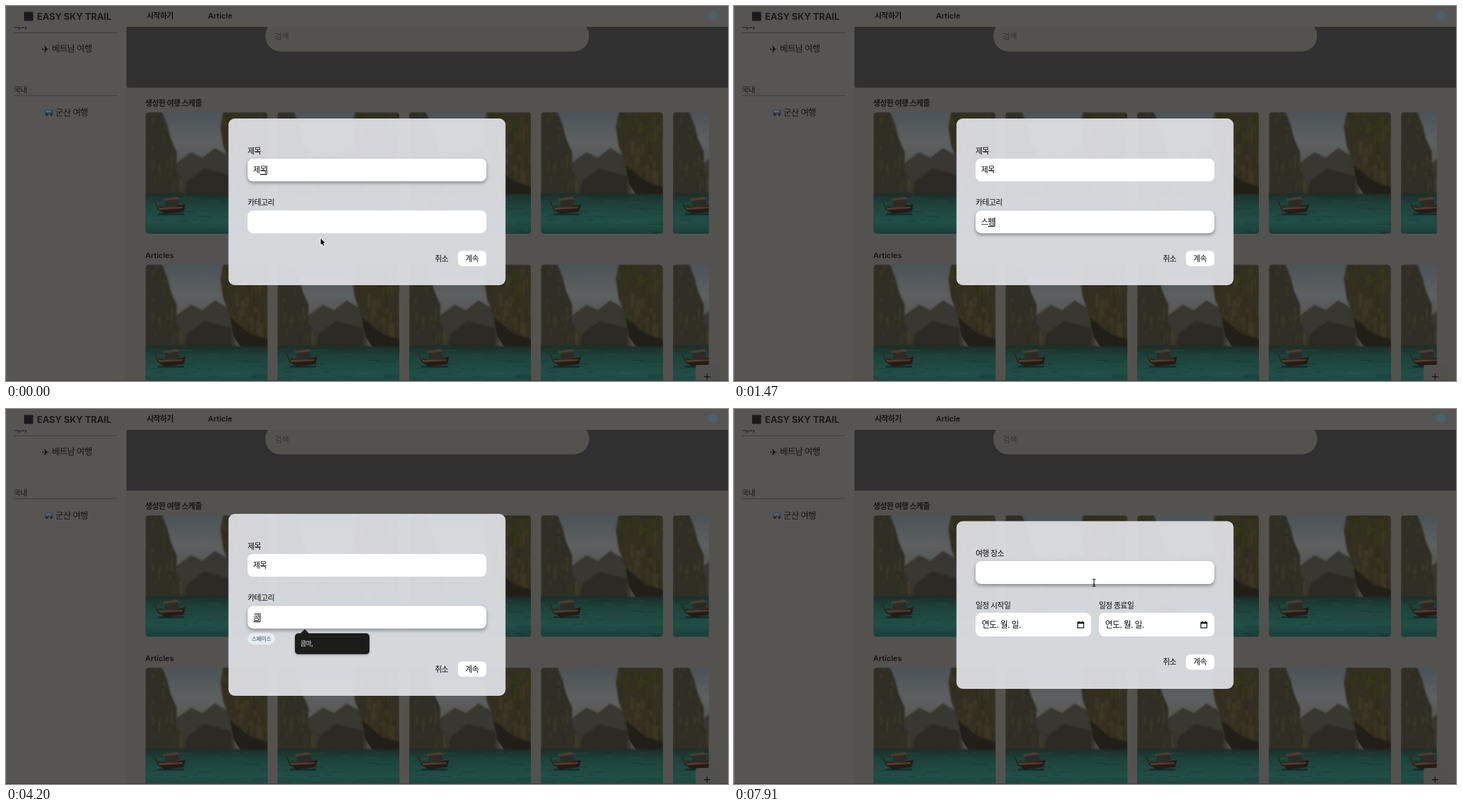
An HTML page with a canvas that plays this animation: 1037x540 px, repeating every 8000 ms.

```html
<!DOCTYPE html>
<html lang="ko">
<head>
<meta charset="utf-8">
<title>Travel planner</title>
<style>
  html, body { margin: 0; width: 100%; height: 100%; overflow: hidden; background: #54524e; }
  canvas { display: block; }
</style>
</head>
<body>
<canvas id="stage" width="1037" height="540"></canvas>
<script>
const W = 1037, H = 540, LOOP = 8000;
const FONT = 'Inter, "Noto Sans CJK KR", "Noto Sans CJK", sans-serif';
const screen = document.getElementById('stage').getContext('2d');
let ctx = screen;

function offscreen(w, h, draw) {
  const canvas = document.createElement('canvas');
  canvas.width = w;
  canvas.height = h;
  const previous = ctx;
  ctx = canvas.getContext('2d');
  draw();
  ctx = previous;
  return canvas;
}

function box(x, y, w, h, r, color) {
  ctx.fillStyle = color;
  ctx.beginPath();
  ctx.roundRect(x, y, w, h, r);
  ctx.fill();
}

function shape(points, color) {
  ctx.fillStyle = color;
  ctx.beginPath();
  points.forEach(([x, y]) => ctx.lineTo(x, y));
  ctx.closePath();
  ctx.fill();
}

function setFont(str, size, weight) {
  ctx.font = `${weight} ${size}px ${FONT}`;
  ctx.letterSpacing = /[ㄱ-힣]/.test(str) ? -size * 0.05 + 'px' : '0px';
}

// y is the vertical middle of the line
function text(str, x, y, size = 11, weight = 500, color = '#0b0b0c') {
  setFont(str, size, weight);
  ctx.fillStyle = color;
  ctx.fillText(str, x, y + size * 0.365);
}

function textWidth(str, size = 11, weight = 500) {
  setFont(str, size, weight);
  return ctx.measureText(str).width;
}

const ramp = (t, a, b) => Math.min(1, Math.max(0, (t - a) / (b - a)));

// ---------- static page ----------

function drawPhoto() {
  let seed = 7;
  const rnd = () => (seed = (seed * 16807) % 2147483647) / 2147483647;
  const streaks = (n, x, y, w, h, color) => {
    for (let i = 0; i < n; i++) {
      ctx.fillStyle = color(rnd());
      ctx.fillRect(x + rnd() * w, y + rnd() * h, 1 + rnd() * 4, 5 + rnd() * 18);
    }
  };

  const sky = ctx.createLinearGradient(0, 0, 0, 110);
  sky.addColorStop(0, '#4c5458');
  sky.addColorStop(0.4, '#5d6060');
  sky.addColorStop(1, '#4c4b46');
  box(0, 0, 176, 176, 0, sky);
  ctx.filter = 'blur(1.2px)';
  shape([[36, 80], [52, 68], [66, 58], [82, 66], [100, 52], [124, 66], [130, 122], [30, 122]], '#383732');
  shape([[60, 100], [84, 82], [124, 92], [124, 122], [54, 122]], '#2b2a24');

  const left = [[0, 0], [24, 0], [31, 18], [36, 38], [45, 58], [44, 84], [56, 102], [60, 120], [0, 122]];
  const right = [[112, 0], [176, 0], [176, 124], [138, 120], [126, 102], [122, 76], [112, 48], [108, 22]];
  const cliff = (points, color, decorate) => {
    ctx.save();
    shape(points, color);
    ctx.clip();
    decorate();
    ctx.restore();
  };
  cliff(left, '#302f25', () =>
    streaks(45, 0, 0, 55, 105, v => `rgba(${50 + v * 24},${51 + v * 17},${35 + v * 14},.5)`));
  cliff(right, '#343021', () => {
    streaks(55, 108, 0, 68, 105, v => `rgba(${42 + v * 36},${40 + v * 28},${24 + v * 22},.55)`);
    streaks(22, 106, 0, 70, 28, v => `rgba(${42 + v * 18},${49 + v * 17},22,.7)`);
    shape([[122, 76], [150, 100], [176, 108], [176, 126], [130, 122]], '#211f18');
  });

  const water = ctx.createLinearGradient(0, 116, 0, 176);
  water.addColorStop(0, '#1b2c27');
  water.addColorStop(0.3, '#1d443c');
  water.addColorStop(0.7, '#214f47');
  water.addColorStop(1, '#1b3f39');
  box(-4, 118, 184, 62, 0, water);
  ctx.filter = 'none';
  for (let i = 0; i < 34; i++) {
    ctx.fillStyle = i % 2 ? 'rgba(62,105,94,.25)' : 'rgba(15,34,31,.28)';
    ctx.fillRect(rnd() * 170, 122 + rnd() * 52, 6 + rnd() * 18, 1);
  }

  shape([[12, 127], [19, 136], [36, 138], [58, 133], [55, 144], [28, 147], [18, 141]], '#251b15');
  shape([[25, 125], [45, 122], [50, 126], [27, 129]], '#4a3d33');
  shape([[28, 128], [47, 126], [49, 136], [29, 138]], '#2e2a25');
  shape([[14, 130], [20, 138], [54, 137], [53, 139], [20, 141]], '#55402e');
  box(18, 146, 38, 3, 2, 'rgba(12,25,22,.55)');
}

const photo = offscreen(176, 176, drawPhoto);

function photoRow(y) {
  ctx.save();
  ctx.beginPath();
  ctx.rect(173, 0, 836.5, H);
  ctx.clip();
  for (let i = 0; i < 5; i++) {
    const x = 200.3 + i * 189.3;
    ctx.save();
    ctx.beginPath();
    ctx.roundRect(x, y, 175.5, 175.5, 5);
    ctx.clip();
    ctx.drawImage(photo, x, y, 175.5, 175.5);
    ctx.restore();
  }
  ctx.restore();
}

function drawPage() {
  const ink = '#171717', rule = '#403f3e', paper = '#54524e', side = '#565553';
  box(0, 0, W, H, 0, paper);
  box(0, 0, 173, H, 0, side);

  text('해외', 11, 29, 11, 400, ink);
  box(11, 38, 150, 1, 0, rule);
  text('✈', 51, 62, 13.5, 400, '#141414');
  text('베트남 여행', 66, 61.5, 12.5, 400, ink);
  text('국내', 11, 120.5, 11, 400, ink);
  box(11, 128.5, 150, 1, 0, rule);
  box(55.5, 149.5, 12.5, 7, 2, '#34475a');
  box(57, 150.5, 8, 2.5, 1, '#5c6870');
  box(57, 155, 3, 3, 1.5, '#1b1b1d');
  box(63.5, 155, 3, 3, 1.5, '#1b1b1d');
  text('군산 여행', 71, 153, 12.5, 400, ink);

  box(173, 30, 864, 87.5, 0, '#303030');
  box(372.5, 21, 465, 44.5, 22, paper);
  text('검색', 386, 43.5, 11.5, 400, '#353433');

  box(0, 0, W, 30, 0, side);
  box(26, 8.5, 13, 13, 0, '#1b1b1e');
  text('EASY SKY TRAIL', 44.5, 15.5, 13, 700, '#1b1b1e');
  text('시작하기', 202, 14, 11, 600, '#141414');
  text('Article', 290, 14, 11, 600, '#141414');
  box(1008, 7, 14, 14, 7, '#4a606b');

  text('생성한 여행 스케줄', 200, 139.5, 11, 600, ink);
  photoRow(152.7);
  text('Articles', 200, 358.5, 11, 600, ink);
  photoRow(372.2);

  box(990.5, 517, 34, 30, 3, '#50504f');
  box(1002.5, 533.2, 9, 1.2, 0, '#111');
  box(1006.4, 529.3, 1.2, 9, 0, '#111');
  box(0, 0, 1, H, 0, '#666563');
  box(0, 539, W, 1, 0, '#3f3d40');
}

const page = offscreen(W, H, drawPage);

// ---------- timeline ----------

// [time, category text, composing, suggestion rows, caret]
const steps = [
  [0, '', 0, 0, 0],
  [350, '', 0, 0, 1],
  [420, '', 0, 6, 1],
  [700, 'ㅅ', 1, 6, 1],
  [770, 'ㅅ', 1, 0, 1],
  [1120, '스', 1, 5, 1],
  [1260, '슾', 1, 0, 1],
  [1400, '스페', 1, 5, 1],
  [1470, '스펭', 1, 0, 1],
  [1540, '스페이', 1, 5, 1],
  [1680, '스페잇', 1, 0, 1],
  [1750, '스페이스', 1, 5, 1],
  [1890, '스페이스 ', 0, 0, 1],
  [2030, '', 0, 0, 1],
  [2450, '', 0, 0, 0],
  [2940, '', 0, 0, 1],
  [3290, 'ㅋ', 1, 0, 1],
  [3640, '코', 1, 0, 1],
  [3780, '콤', 1, 1, 1],
  [3850, '코마', 1, 0, 1],
  [4200, '콤', 1, 1, 1],
  [4340, '콤ㅁ', 1, 0, 1],
  [4410, '콤마', 1, 1, 1],
  [4620, '콤마,', 0, 1, 1],
  [4690, '', 0, 0, 1],
  [5180, '', 0, 0, 0],
  [5320, 'ㅌ', 1, 0, 1],
  [5460, '태', 1, 0, 1],
  [5670, '탭', 1, 0, 1],
  [5950, '', 0, 0, 0]
];
const history = ['스페이스', '스페이스', '스페이스2', '스페이스2', '스페이스3', '콤마,'];
const tags = [[2030, '스페이스'], [4690, '콤마'], [5950, '탭']];

// [time, x, y] of the pointer tip
const pointerPath = [
  [0, 452, 335], [70, 452, 335], [300, 440, 321], [700, 440, 321],
  [6160, 438, 323], [6300, 402, 372], [6440, 440, 428], [6600, 560, 430],
  [6760, 690, 400], [6930, 680, 379], [7560, 680, 379], [7840, 520, 256], [7910, 517, 250], [LOOP, 517, 250]
];

// ---------- dialog ----------

function field(x, y, w, h, focus) {
  ctx.save();
  if (focus > 0) {
    ctx.shadowColor = `rgba(0,0,0,${0.36 * focus})`;
    ctx.shadowBlur = 5;
    ctx.shadowOffsetY = 2.5;
  }
  box(x, y, w, h, 8, '#fff');
  ctx.restore();
}

function fieldText(str, y, composing, caret) {
  text(str, 355, y);
  const end = 355 + textWidth(str);
  if (composing) {
    const start = 355 + textWidth(str.slice(0, -1));
    box(start + 0.5, y + 5.7, end - start - 0.5, 1.2, 0, '#000');
  }
  if (caret) box(end, y - 6.5, 1, 13, 0, '#111');
}

function dialog(y, h) {
  box(319.5, y, 398, h, 9, 'rgba(222,223,227,.95)');
}

function buttons(y, hovered) {
  text('취소', 616, y);
  box(649, y - 11, 41, 22, 6, hovered ? '#f2f2f3' : '#fff');
  text('계속', 659.7, y);
}

function suggestions(rows, y) {
  const list = rows === 1 ? history.slice(-1) : history.slice(0, rows);
  ctx.save();
  ctx.shadowColor = 'rgba(0,0,0,.35)';
  ctx.shadowBlur = 3;
  ctx.shadowOffsetY = 1;
  box(415, y, 107, 5.5 + 24.6 * rows, 5, '#1c1c1b');
  ctx.restore();
  shape([[422.5, y + 0.5], [429, y - 6], [435.5, y + 0.5]], '#1c1c1b');
  list.forEach((item, i) => text(item, 423, y + 15.2 + 24.6 * i, 8.9, 500, '#f4f4f4'));
}

function drawTags(t) {
  let x = 347;
  for (const [since, label] of tags) {
    if (t < since) break;
    const w = textWidth(label, 8, 400) + 11.5;
    box(x, 322.5, w, 16.5, 8.2, '#e7eef0');
    text(label, x + 5.8, 331, 8, 400, '#2f5566');
    x += w + 3;
  }
}

function categoryDialog(t, hovered) {
  const tagged = t >= 2030;
  const shift = tagged ? 11 : 0;
  const [, str, composing, rows, caret] = steps.findLast(step => step[0] <= t);
  const moved = ramp(t, 350, 490);
  dialog(162 - shift, 240 + shift * 2);
  text('제목', 347, 209 - shift);
  field(347, 219.7 - shift, 343, 32.8, 1 - moved);
  fieldText('제목', 236.3 - shift, t < 350, t < 350);
  text('카테고리', 347, 283.3 - shift);
  field(347, 294.4 - shift, 343, 32.8, moved * (1 - ramp(t, 5950, 6040)));
  fieldText(str, 311 - shift, composing, caret);
  drawTags(t);
  buttons(363.6 + shift, hovered);
  if (rows) suggestions(rows, 334 - shift);
}

function dateField(x, label) {
  text(label, x, 282.8);
  field(x, 293.6, 166, 34, 0);
  text('연도. 월. 일.', x + 9, 311, 12, 400);
  ctx.strokeStyle = '#111';
  ctx.lineWidth = 1.2;
  ctx.strokeRect(x + 146.6, 307.3, 8.6, 7.8);
  box(x + 146, 306.7, 9.8, 2.6, 1, '#111');
  box(x + 148, 305.5, 1.2, 2, 0, '#111');
  box(x + 152.7, 305.5, 1.2, 2, 0, '#111');
}

function scheduleDialog(t) {
  dialog(161.5, 241.5);
  text('여행 장소', 347, 208.3);
  field(347, 219, 343, 33, ramp(t, 7770, 7910));
  dateField(347, '일정 시작일');
  dateField(524, '일정 종료일');
  buttons(364.4, false);
}

// ---------- pointer ----------

function pointerAt(t) {
  const i = pointerPath.findIndex(p => p[0] > t);
  const [t0, x0, y0] = pointerPath[i - 1], [t1, x1, y1] = pointerPath[i];
  const k = (t - t0) / (t1 - t0);
  return [x0 + (x1 - x0) * k, y0 + (y1 - y0) * k];
}

function drawArrow(x, y) {
  const outline = [[0, 0], [0, 8.6], [2, 6.9], [3.4, 10], [4.9, 9.3], [3.5, 6.3], [6.2, 6.1]];
  ctx.save();
  ctx.translate(x, y);
  ctx.strokeStyle = '#fff';
  ctx.lineWidth = 1.3;
  shape(outline, '#000');
  ctx.stroke();
  ctx.fill();
  ctx.restore();
}

function drawBeam(x, y) {
  box(x - 0.5, y - 4.5, 1.1, 9.5, 0, '#111');
  box(x - 2.5, y - 5.3, 5, 1, 0, '#111');
  box(x - 2.5, y + 4.7, 5, 1, 0, '#111');
  box(x - 1.5, y + 1.8, 3, 0.9, 0, '#111');
}

// ---------- loop ----------

function render(now) {
  const t = now % LOOP;
  const [x, y] = pointerAt(t);
  ctx.drawImage(page, 0, 0);
  if (t < 7070) categoryDialog(t, t > 6160 && x > 649 && x < 690 && y > 363 && y < 386);
  else scheduleDialog(t);

  if (t < 700 || t >= 6160) {
    const overField = t < 700 ? y < 327 : t >= 7070 && (y < 252 || (y > 293 && y < 327));
    (overField ? drawBeam : drawArrow)(x, y);
  }
  requestAnimationFrame(render);
}

requestAnimationFrame(render);
</script>
</body>
</html>
```
